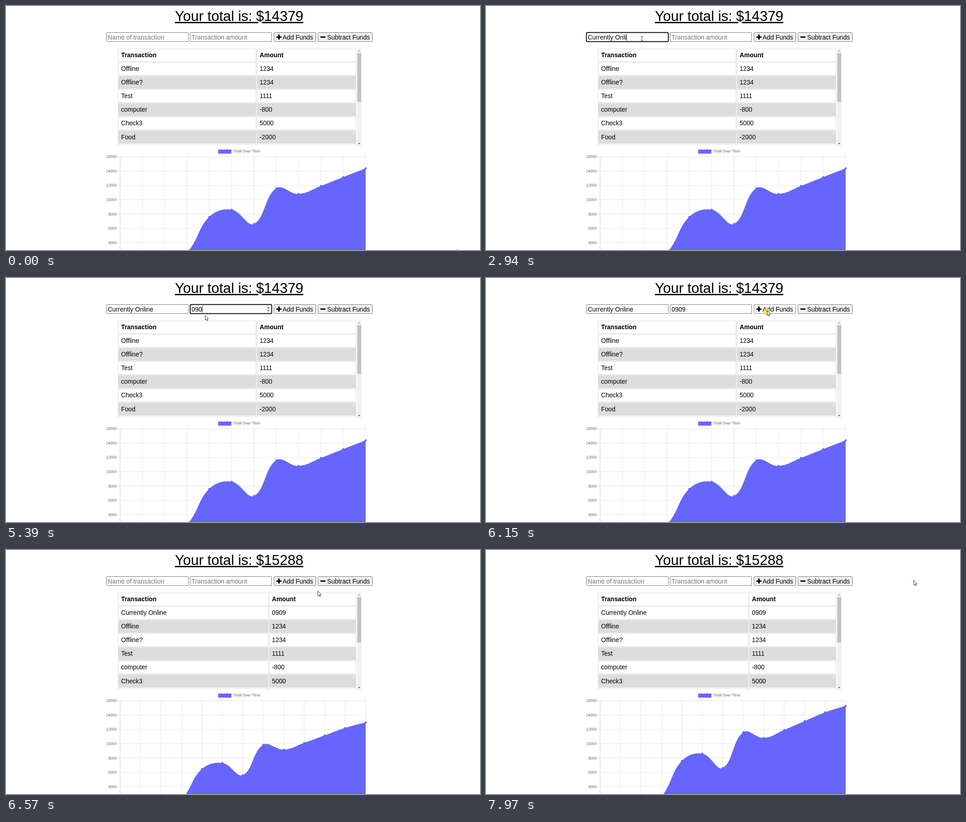
Write an HTML page that moves like this. It is 1041 px wide and 538 px high and loops after 8 s.

```html
<!DOCTYPE html>
<html lang="en">
<head>
<meta charset="utf-8">
<title>Budget tracker</title>
<style>
html, body { margin: 0; width: 100%; height: 100%; overflow: hidden; background: #fff; }
body { position: relative; font-family: "Liberation Sans", Arial, sans-serif; }
#total {
  position: absolute; left: 371px; top: 2.5px; white-space: pre;
  font-size: 31.05px; line-height: 40px; text-decoration: underline;
}
svg { position: absolute; left: 0; top: 0; display: block; }
text { font-size: 13.85px; white-space: pre; }
.bold { font-weight: bold; }
.hint { fill: #757575; }
.small { font-size: 8.5px; fill: #666; }
.end { text-anchor: end; }
.box { fill: #fff; stroke: #767676; }
.box.focus { stroke: #101010; stroke-width: 2; }
.button { fill: #efefef; stroke: #767676; }
.button.hover { fill: #e5e5e5; stroke: #4f4f4f; }
.button.down { fill: #f5f5f5; stroke: #8d8d8d; }
.grid { stroke: #000; stroke-opacity: .1; fill: none; }
</style>
</head>
<body>
<svg width="1041" height="538" viewBox="0 0 1041 538">
  <defs>
    <clipPath id="list"><rect x="240" y="90" width="545" height="219"/></clipPath>
    <clipPath id="area"><rect x="250" y="332" width="540" height="253"/></clipPath>
  </defs>
  <g id="fields"></g>
  <g id="buttons">
    <rect id="add" class="button" x="588.5" y="58.5" width="92" height="20" rx="2"/>
    <path d="M594 68.5h11M599.5 63v11" stroke="#000" stroke-width="3"/>
    <text x="607.5" y="73.5">Add Funds</text>
    <rect class="button" x="685" y="58.5" width="119.5" height="20" rx="2"/>
    <path d="M690.5 68.5h11" stroke="#000" stroke-width="3"/>
    <text x="705.3" y="73.5">Subtract Funds</text>
  </g>
  <g id="table" clip-path="url(#list)"></g>
  <rect x="466" y="316.5" width="29" height="9" fill="#66f"/>
  <text class="small" x="499.3" y="323.4" style="font-size:8.4px">Total Over Time</text>
  <g id="axes"></g>
  <g id="plot"></g>
  <circle id="click" r="7.5" fill="#ffdc32" opacity=".72"/>
  <g id="mouse">
    <path id="arrow" d="M.5 .3V10.7L2.9 8.5L4.6 12.4L6.3 11.7L4.7 7.9H7.9Z" fill="#fff" stroke="#222" stroke-width=".9"/>
    <path id="beam" d="M-2.5 -5H-.6L0 -4.5L.6 -5H2.5M0 -4.5V4.5M-2.5 5H-.6L0 4.5L.6 5H2.5" fill="none" stroke="#222" stroke-width=".9"/>
  </g>
</svg>
<div id="total"></div>
<script>
const LOOP = 8000, SUBMIT = 6195;
const TOP = 332.5, LEFT = 250.5, RIGHT = 789.8, STEP = 31.55;
const BASE = TOP + 8 * STEP;
const $ = id => document.getElementById(id);

const rows = [["Offline", 1234], ["Offline?", 1234], ["Test", 1111], ["computer", -800],
  ["Check3", 5000], ["Food", -2000], ["", ""]];
const totals = [200, 500, 1000, 2600, 7600, 8600, 6600, 11600, 10800, 11911, 13145, 14379];
const views = [
  { rows, totals, split: 550, thumb: 107.5 },
  { rows: [["Currently Online", "0909"], ...rows.slice(0, 6)], totals: [...totals, 15288], split: 577, thumb: 100 }
];

// Times at which each character appears
const nameKeys = [1070, ...Array.from({ length: 9 }, (_, i) => 1400 + i * 100),
  2400, 2650, 2800, 2890, 2980, 3070];
const amountKeys = [4840, 5110, 5310, 5500];

const clicks = [[690, 805], [3960, 4085], [6090, 6200]];
// time, x, y
const path = [
  [0, 991, 536.5], [70, 975, 515], [250, 830, 370], [450, 560, 175], [620, 385, 86], [740, 345, 72], [810, 342.5, 72],
  [3590, 342.5, 72], [3750, 372, 74], [3920, 425, 76], [4090, 434.5, 75], [4480, 434.5, 75],
  [4600, 436, 79], [4800, 437, 82], [5500, 437, 82], [5700, 480, 82], [5880, 566, 79],
  [6020, 606, 74], [6100, 617, 72], [6200, 617, 72], [6360, 618, 73], [6500, 650, 82],
  [6710, 776, 110], [6820, 840, 121], [6920, 878, 118.5], [7120, 935, 82], [7300, 952, 36],
  [7400, 951, 26], [7550, 945, 53], [7620, 944, 56], [7800, 940, 64], [7970, 939, 66.5], [8000, 939, 66.5]
];

// Monotone cubic through the path, so that rests stay still
function mouseAt(t) {
  let i = 0;
  while (i < path.length - 2 && t >= path[i + 1][0]) i++;
  const a = path[i], b = path[i + 1], h = b[0] - a[0], u = (t - a[0]) / h;
  const slope = (j, k) => (path[j + 1][k] - path[j][k]) / (path[j + 1][0] - path[j][0]);
  const tangent = (j, k) => {
    if (j === 0 || j === path.length - 1) return 0;
    const p = slope(j - 1, k), q = slope(j, k);
    return p * q > 0 ? 2 * p * q / (p + q) : 0;
  };
  return [1, 2].map(k => {
    const v = u * u * (3 - 2 * u);
    return a[k] + (b[k] - a[k]) * v +
      h * u * (1 - u) * ((1 - u) * tangent(i, k) - u * tangent(i + 1, k));
  });
}

const line = d => `<path class="grid" d="${d}"/>`;

function drawTable({ rows, split, thumb }) {
  let out = "";
  const cells = (texts, i) => {
    const y = 94.5 + i * 30.05, fill = i && i % 2 === 0 ? "#ddd" : "#fff";
    const weight = i ? "" : "bold";
    [[246.5, split - 1], [split + 1, 768.5]].forEach(([x, end], c) => {
      out += `<rect x="${x}" y="${y}" width="${end - x}" height="28" fill="${fill}" stroke="#ddd"/>
        <text class="${weight}" x="${c ? split + 7 : 252.7}" y="${y + 18.7}">${texts[c]}</text>`;
    });
  };
  [["Transaction", "Amount"], ...rows].forEach(cells);
  return out + `<rect x="770.5" y="93" width="10.5" height="216" fill="#f1f1f1"/>
    <rect x="771.5" y="104" width="8.5" height="${thumb}" fill="#c1c1c1"/>
    <path d="M773 100.2h5l-2.5-2.7z" fill="#a3a3a3"/>
    <path d="M773 302.2h5l-2.5 2.7z" fill="#505050"/>`;
}

function drawAxes({ totals }) {
  const gap = (RIGHT - LEFT) / (totals.length - 1);
  let out = "";
  for (let k = 0; k <= 6; k++) {
    const y = TOP + k * STEP;
    out += line(`M243.5 ${y}H${RIGHT}`) +
      `<text class="small end" x="243.3" y="${y + 2.8}">${16000 - k * 2000}</text>`;
  }
  totals.forEach((_, i) => out += line(`M${LEFT + i * gap} ${TOP}V538`));
  return out + line(`M${LEFT} ${TOP}V538`);
}

// Spline control points follow the neighbours' distances; heights grow with "grow"
function drawPlot({ totals }, grow) {
  const gap = (RIGHT - LEFT) / (totals.length - 1);
  const pts = totals.map((v, i) => [LEFT + i * gap, BASE - v * STEP / 2000]);
  const handles = pts.map((p, i) => {
    const a = pts[i - 1] || p, b = pts[i + 1] || p;
    const da = Math.hypot(p[0] - a[0], p[1] - a[1]), db = Math.hypot(b[0] - p[0], b[1] - p[1]);
    const at = f => [p[0] + f * (b[0] - a[0]), Math.min(BASE, p[1] + f * (b[1] - a[1]))];
    return [at(-.4 * da / (da + db)), at(.4 * db / (da + db))];
  });
  const put = ([x, y]) => `${x.toFixed(2)} ${(BASE + (y - BASE) * grow).toFixed(2)}`;
  let d = "M" + put(pts[0]);
  for (let i = 1; i < pts.length; i++)
    d += `C${put(handles[i - 1][1])} ${put(handles[i][0])} ${put(pts[i])}`;
  const dots = pts.map(([x, y]) =>
    `<circle cx="${x}" cy="${BASE + (y - BASE) * grow}" r="2.2" fill="#66f" stroke="#000" stroke-opacity=".1" stroke-width=".7"/>`);
  return `<g clip-path="url(#area)"><path d="${d}V${BASE}H${LEFT}Z" fill="#66f"/>
    <path d="${d}" class="grid" stroke-width="2"/></g>` + dots.join("");
}

function drawField(x, width, hint, value, focus) {
  return `<rect class="box ${focus ? "focus" : ""}" x="${x}" y="58.5" width="${width}" height="20" rx="${focus ? 2 : 1}"/>
    <text class="${value ? "" : "hint"}" x="${x + 3}" y="73.5">${value || hint}</text>`;
}

function drawFields(name, amount, focus) {
  const g = $("fields");
  g.innerHTML = drawField(220.5, 180, "Name of transaction", name, focus === 1) +
    drawField(404.5, 179, "Transaction amount", amount, focus === 2);
  if (!focus) return;
  const value = focus === 1 ? name : amount;
  const label = g.querySelectorAll("text")[focus - 1];
  const x = +label.getAttribute("x") + (value ? label.getComputedTextLength() : 0);
  g.innerHTML += `<path d="M${x + .4} 62V76" stroke="#000"/>`;
  if (focus === 2)
    g.innerHTML += `<rect x="571" y="61.5" width="10" height="14" fill="#efefef"/>
      <path d="M573.5 66.7h5l-2.5-3zM573.5 70.7h5l-2.5 3z" fill="#505050"/>`;
}

// Redraw a part only when what it shows has changed
const shown = {};
function update(part, key, draw) {
  if (shown[part] === key) return;
  shown[part] = key;
  draw();
}

const typed = (text, keys, t) => text.slice(0, keys.filter(k => t >= k).length);

function render(t) {
  const done = t >= SUBMIT, view = views[+done];
  const name = done ? "" : typed("Currently Online", nameKeys, t);
  const amount = done ? "" : typed("0909", amountKeys, t);
  const focus = t < 720 || t >= 6100 ? 0 : t < 4000 ? 1 : 2;
  update("view", done, () => {
    $("total").textContent = "Your total is: $" + view.totals.at(-1);
    $("table").innerHTML = drawTable(view);
    $("axes").innerHTML = drawAxes(view);
  });
  update("fields", [name, amount, focus].join("|"), () => drawFields(name, amount, focus));

  const p = Math.min(1, (t - SUBMIT) / 1000);
  const grow = done ? 1 - (1 - p) ** 4 : 1;
  update("plot", done + "|" + grow, () => $("plot").innerHTML = drawPlot(view, grow));

  const [x, y] = mouseAt(t);
  const inRow = y > 58 && y < 79;
  const overField = inRow && (x > 220 && x < 401 || x > 404 && x < 584);
  const overAdd = inRow && x > 588 && x < 681;
  const pressed = clicks.some(([a, b]) => t >= a && t < b);
  $("mouse").setAttribute("transform", `translate(${x} ${y})`);
  $("arrow").style.display = overField ? "none" : "";
  $("beam").style.display = overField ? "" : "none";
  $("click").style.display = pressed ? "" : "none";
  $("click").setAttribute("transform", `translate(${x - .5} ${y + 2})`);
  $("add").setAttribute("class", "button" + (overAdd ? pressed ? " down" : " hover" : ""));
}

const start = performance.now();
function tick() {
  render((performance.now() - start) % LOOP);
  requestAnimationFrame(tick);
}
tick();
</script>
</body>
</html>
```
